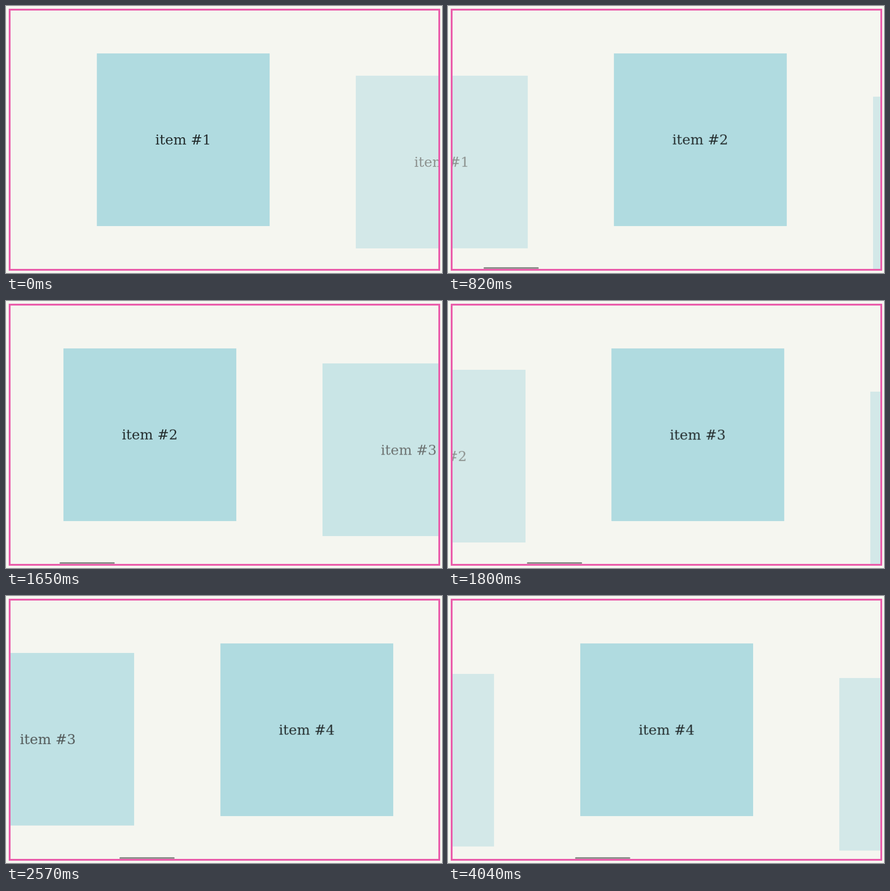
These frames come from a looping animation (956 by 586 pixels, 4100 ms). An HTML page:

```html
<!DOCTYPE html>
<html lang="en">
<head>
<meta charset="utf-8">
<title>Snap carousel</title>
<style>
  html, body { margin: 0; width: 100%; height: 100%; overflow: hidden; background: #f5f6f0; }
  #view {
    position: absolute; left: 6px; top: 6px; width: 946px; height: 575px;
    box-sizing: border-box; border: 4px solid #ea5caa; overflow: hidden;
  }
  .item {
    position: absolute; left: 0; top: 0; width: 378.5px; height: 378.5px;
    display: flex; align-items: center; justify-content: center;
    background: #b0dbe0; color: #232c2d; white-space: nowrap;
    font: 30.28px "DejaVu Serif", serif; will-change: transform;
  }
  #thumb {
    position: absolute; left: 0; top: 563px; width: 120.5px; height: 3px;
    border-radius: 1.5px; background: #777b77;
  }
</style>
</head>
<body>
<div id="view"></div>
<script>
const LOOP = 4100, TICK = 8, COUNT = 5;
const SIZE = 378.5, PITCH = SIZE * 1.5, VIEW = 938.6, FIRST = SIZE / 2;
const TOP = 94.1, DROP = SIZE / 4;
const FIRST_SNAP = FIRST + PITCH - (VIEW - SIZE) / 2;

const flicks = [
  { start: 505, pace: 53, distance: FIRST_SNAP },
  { start: 1540, pace: 40.9, distance: PITCH },
  { start: 2375.6, pace: 42, distance: PITCH }
];

// Slow start, quick middle, exponential settling
function settle(x) {
  return x <= 0 ? 0 : 1 - Math.exp(-x) * (1 + x + x ** 2 / 2 + x ** 3 / 6);
}

const scrollAt = t => flicks.reduce(
  (sum, { start, pace, distance }) => sum + distance * settle((t - start) / pace), 0);

const leftOf = (index, scroll) => FIRST + PITCH * index - scroll;

function visibleRatio(index, scroll) {
  const left = leftOf(index, scroll);
  const shown = Math.min(left + SIZE, VIEW) - Math.max(left, 0);
  return Math.min(1, Math.max(0, shown / SIZE));
}

// Visibility is only reported when it crosses a tenth
function observe(index) {
  const reports = [];
  let level = -1, ratio = 0;
  for (let t = 0; t <= LOOP; t += TICK) {
    const now = visibleRatio(index, scrollAt(t));
    const nowLevel = Math.floor(now * 10 + 1e-6);
    if (nowLevel !== level) { level = nowLevel; ratio = now; }
    reports.push(ratio);
  }
  return reports;
}

const view = document.getElementById("view");
const add = props => view.appendChild(Object.assign(document.createElement("div"), props));
const items = Array.from({ length: COUNT }, (_, i) => ({
  el: add({ className: "item", textContent: "item #" + (i + 1) }),
  reports: observe(i)
}));
const thumb = add({ id: "thumb" });

function draw(t) {
  const scroll = scrollAt(t), tick = Math.floor(t / TICK);
  items.forEach(({ el, reports }, i) => {
    const ratio = reports[tick];
    el.style.transform = `translate(${leftOf(i, scroll)}px, ${TOP + DROP * (1 - ratio)}px)`;
    el.style.opacity = Math.max(0.5, ratio);
  });
  thumb.style.transform = `translate(${1.1 + scroll * 0.1659}px, 0.5px)`;
  thumb.style.visibility = t < flicks[0].start ? "hidden" : "visible";
}

const start = performance.now();
function frame() {
  draw((performance.now() - start) % LOOP);
  requestAnimationFrame(frame);
}
frame();
</script>
</body>
</html>
```
